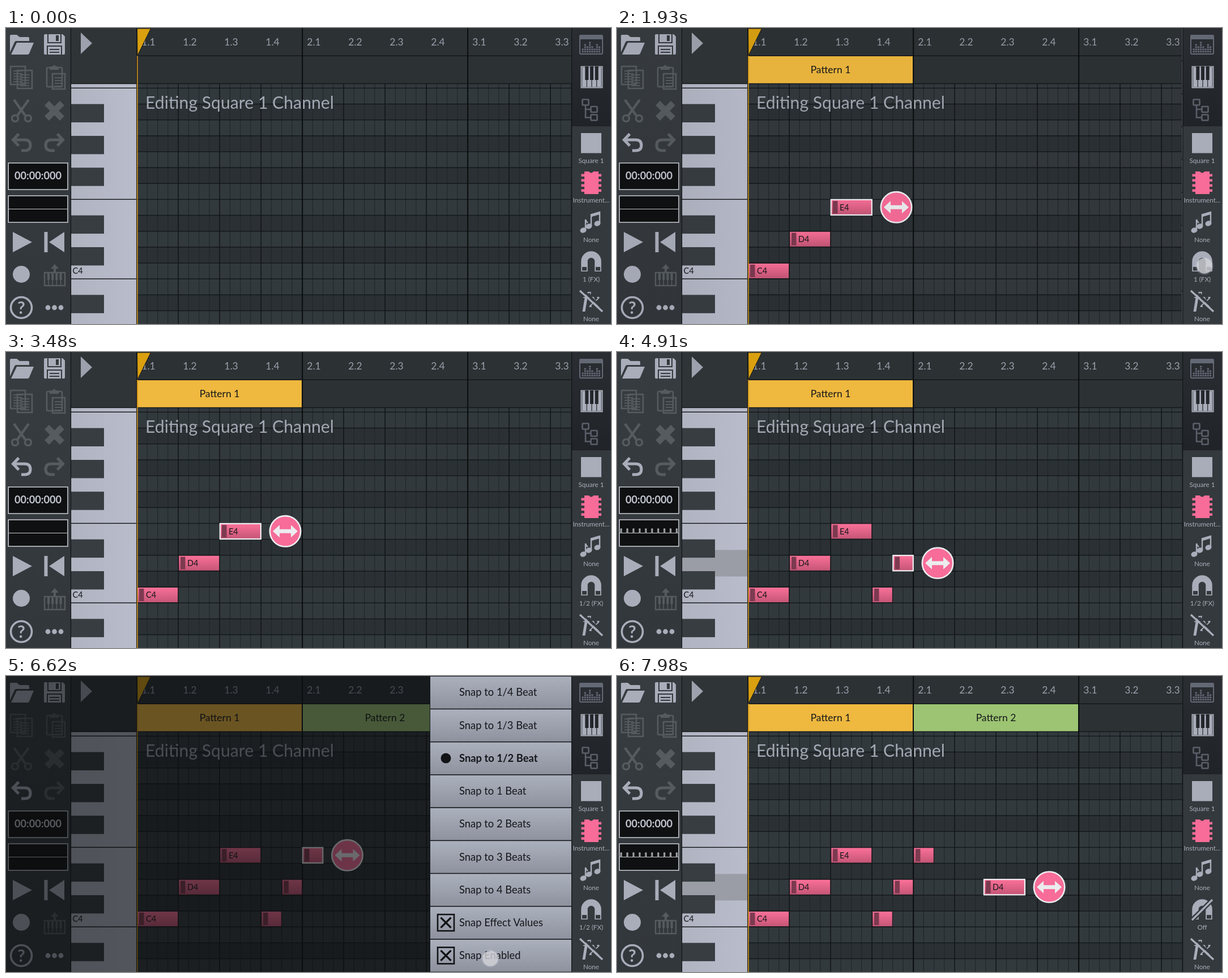
Animation, 1068 px wide and 524 px high, one loop 8 s. Source, as an HTML page:

```html
<!DOCTYPE html>
<html lang="en">
<head>
<meta charset="utf-8">
<title>Piano roll</title>
<style>
  html, body { margin: 0; width: 100%; height: 100%; overflow: hidden; background: #2c3134; }
  svg { display: block; width: 100vw; height: 100vh; font-family: Lato, "Open Sans", sans-serif; }
  .on { fill: #a9adba; }
  .off { fill: #555b5f; }
  .line { fill: none; stroke: #a9adba; }
  .offline { fill: none; stroke: #555b5f; }
  .small { font-size: 11.7px; text-anchor: middle; fill: #a9adba; }
</style>
</head>
<body>
<svg id="stage" viewBox="0 0 1068 524" preserveAspectRatio="none"></svg>
<script>
const LOOP = 8000, STEP = 70;
const X0 = 231, BEAT = 73, ROW = 28.15, TOP = 106.2, EDGE = 998;
const PANEL = '#34393d', DARK = '#131719';

const rect = (x, y, w, h, fill, extra = '') =>
  `<rect x="${x}" y="${y}" width="${w}" height="${h}" fill="${fill}" ${extra}/>`;
const path = (d, cls, extra = '') => `<path d="${d}" class="${cls}" ${extra}/>`;
const stroke = (d, color, width, extra = '') =>
  `<path d="${d}" fill="none" stroke="${color}" stroke-width="${width}" ${extra}/>`;
const text = (x, y, size, fill, str, extra = '') =>
  `<text x="${x}" y="${y}" font-size="${size}" fill="${fill}" ${extra}>${str}</text>`;
const dot = (x, y, r, fill) => `<circle cx="${x}" cy="${y}" r="${r}" fill="${fill}"/>`;
const times = (n, f) => Array.from({ length: n }, (_, i) => f(i)).join('');
const gradient = (id, a, b, dir = 'x2="0" y2="1"') =>
  `<linearGradient id="${id}" ${dir}><stop stop-color="${a}"/><stop offset="1" stop-color="${b}"/></linearGradient>`;
const clamp = v => Math.min(1, Math.max(0, v));

// Intervals in which the picture advances; it rests between them.
const SPANS = [[0, 0], [260, 1800], [1860, 2140], [3200, 3480], [4070, 5960], [6620, 6900], [7490, 7980]];
function snapTime(t) {
  const [a, b] = SPANS.filter(s => s[0] <= t).pop();
  return Math.min(b, a + STEP * Math.floor((t - a) / STEP));
}

const PITCH = {
  E4: { row: 7, key: 303.4, period: 9.7 },
  D4: { row: 9, key: 350.4, period: 10.9 },
  C4: { row: 11, key: 397.4, period: 12.2 }
};
const NOTES = [
  { at: 330, beat: 0, len: 1, name: 'C4' },
  { at: 820, beat: 1, len: 1, name: 'D4' },
  { at: 1310, beat: 2, len: 1, name: 'E4' },
  { at: 4140, beat: 3, len: .5, name: 'C4' },
  { at: 4630, beat: 3.5, len: .5, name: 'D4' },
  { at: 5120, beat: 4, len: .5, name: 'E4' },
  { at: 7560, beat: 5.7, len: 1, name: 'D4', free: true }
];
const SOUND = 490;
const rowY = r => TOP + ROW * r;
const TOUCHES = NOTES.map(n => ({
  at: n.at - STEP,
  x: X0 + BEAT * n.beat + (n.free ? 1 : 30 * n.len),
  y: rowY(PITCH[n.name].row) + 6.5
})).concat([
  { at: 1860, x: 1037, y: 421 },
  { at: 3200, x: 868, y: 148 },
  { at: 5680, x: 1037, y: 421 },
  { at: 6620, x: 855, y: 500 }
]);
const MENUS = [{ open: 1920, close: 3200 }, { open: 5737, close: 6620 }];
const ITEMS = ['1/4 Beat', '1/3 Beat', '1/2 Beat', '1 Beat', '2 Beats', '3 Beats', '4 Beats']
  .map(s => 'Snap to ' + s).concat('Snap Effect Values', 'Snap Enabled');

function grid() {
  const isBlack = r => [1, 3, 5, 8, 10, 13].includes(r);
  return rect(X0, 98, 768, 426, '#32393d') +
    times(15, r => isBlack(r) ? rect(X0, rowY(r), 768, ROW, '#2a3034') : '') +
    times(43, i => i % 4 ? rect(X0 + i * BEAT / 4 - .5, 99, 1.2, 425, '#22272a') : '') +
    times(15, r => rect(X0, rowY(r) - .5, 768, 1.4, DARK)) +
    times(11, i => rect(X0 + i * BEAT - .7, 98, 1.6, 426, DARK)) +
    rect(X0, 0, 768, 98, '#2c3134') +
    rect(X0, 48.5, 768, 1.4, DARK) + rect(X0, 97.8, 768, 1.4, DARK) +
    [4, 8].map(b => rect(X0 + b * BEAT - .9, 0, 2.1, 524, '#0c0f10')).join('') +
    times(11, i => text(X0 + 8.3 + i * BEAT, 31, 17.5, '#9a9fab', `${1 + (i >> 2)}.${1 + i % 4}`)) +
    text(246, 143, 30.2, '#a3a8b3', 'Editing Square 1 Channel');
}

function keys() {
  return rect(115, 0, 116, 98, '#2f3437') +
    path('M132 8V46L152 27z', 'on', 'opacity=".9"') +
    rect(115, 99, 115, 425, 'url(#ivory)') +
    '<rect id="press" x="115" width="115" height="47" fill="#9b9da6"/>' +
    [1, 3, 5, 8, 10, 13].map(r => rect(115, rowY(r) + .3, 58, 32.4, '#373d41')).join('') +
    [0, 7, 12].map(r => rect(115, rowY(r) - .6, 116, 1.4, '#101214')).join('') +
    rect(115, 97.8, 116, 1.4, DARK) + rect(230, 0, 1.2, 524, DARK) +
    text(117.5, 435, 14.5, '#15171a', 'C4');
}

function tools() {
  const back = 'M22.500 187.500L12.500 198L22.500 208.500M13 198H33q10 0 10 9.500t-10 9.500H27';
  const page = (x, y) =>
    rect(x, y, 26, 32, PANEL, 'class="offline" stroke-width="2.6"') +
    times(5, i => rect(x + 5, y + 7 + i * 4.8, 16, 2, '#555b5f'));
  return rect(0, 0, 114, 524, 'url(#side)') + rect(113.8, 0, 1.3, 524, DARK) +
    // open and save
    path('M7 43V14q0-2 2-2h10l5 4h15q2 0 2 2v5H18q-2 0-3 2z', 'on') +
    path('M19 26H49L41 45q-1 2-3 2H9z', 'on') +
    path('M69 11H100l4 4V45q0 2-2 2H69q-2 0-2-2V13q0-2 2-2z', 'on') +
    rect(73, 11, 25, 16, PANEL) + rect(75, 11, 21, 14, '#a9adba') + rect(88, 13, 5, 10, PANEL) +
    rect(72, 31, 27, 16, PANEL) + rect(74, 33, 23, 14, '#a9adba') +
    rect(77, 37, 17, 2, PANEL) + rect(77, 42, 17, 2, PANEL) +
    // copy and paste
    page(8, 68) + page(20, 75) +
    rect(72, 70, 27, 34, PANEL, 'class="offline" stroke-width="2.6" rx="2"') +
    path('M77 74v-4q0-2 2-2h3q3-5 6 0h3q2 0 2 2v4z', 'off') +
    rect(82, 81, 22, 27, PANEL, 'class="offline" stroke-width="2.6"') +
    times(4, i => rect(86, 87 + i * 5, 14, 2, '#555b5f')) +
    // cut and delete
    path('M14 127L34 155M40 127L20 155', 'offline', 'stroke-width="4.500"') +
    '<circle cx="16" cy="160" r="5.5" class="offline" stroke-width="3.5"/>' +
    '<circle cx="39" cy="160" r="5.5" class="offline" stroke-width="3.5"/>' +
    path('M72 133L99 160M99 133L72 160', 'offline', 'stroke-width="11"') +
    // undo and redo
    path(back, '', 'id="undo" fill="none" stroke-width="5"') +
    path(back, 'offline', 'stroke-width="5" transform="translate(113 0) scale(-1 1)"') +
    // clock and scope
    [239, 297].map(y => rect(4.2, y, 104.8, 47, '#0e1011', 'stroke="#c3c6cd" stroke-width="1.6"')).join('') +
    text(56.5, 268, 18.2, '#c3c6d2', '00:00:000', 'font-weight="700" text-anchor="middle"') +
    '<path id="scope" fill="none" stroke="#c9ccd3" stroke-width="1.2"/>' +
    // transport
    path('M12 361V397L46 379z', 'on') + rect(67.5, 361, 6, 36, '#a9adba') +
    path('M103 361V397L76 379z', 'on') + dot(27, 436, 15, '#a9adba') +
    rect(68, 433, 36, 23, 'none', 'class="offline" stroke-width="2.4"') +
    times(4, i => rect(73 + i * 7.2, 433, 4, 13, '#555b5f') + rect(74.2 + i * 7.2, 446, 1.6, 10, '#555b5f')) +
    path('M86 418L93 426H88V432H84V426H79z', 'off') +
    '<circle cx="27" cy="495" r="18.5" class="line" stroke-width="3.6"/>' +
    text(27, 505.5, 30, '#a9adba', '?', 'font-weight="700" text-anchor="middle"') +
    [74, 85.5, 97].map(x => dot(x, 495, 4.4, '#a9adba')).join('');
}

function sidebar() {
  const dim = '#646976', label = (y, s, id = '') => `<text x="1033" y="${y}" class="small" ${id}>${s}</text>`;
  return rect(EDGE, 0, 70, 524, PANEL) + rect(EDGE, 0, 70, 174, 'url(#shade)') +
    rect(EDGE, 0, 1.3, 524, DARK) +
    // mixer
    rect(1013, 13, 40, 33, 'none', `stroke="${dim}" stroke-width="2" rx="2"`) + rect(1013, 12, 40, 8, dim) +
    [2, 4, 3, 5, 3, 2, 4, 3].map((n, i) =>
      times(n, k => rect(1016.5 + i * 4.2, 40.5 - k * 4, 3.2, 2.8, dim))).join('') +
    // piano
    rect(1014.500, 67.500, 39, 39, '#a9adba') + rect(1016.5, 69.5, 35, 35, '#23272b') +
    times(4, i => rect(1017.2 + i * 8.7, 69.5, 7.5, 35, '#a9adba')) +
    times(3, i => rect(1022.3 + i * 8.7, 68, 6, 24, '#23272b')) +
    // routing tree
    [[1017.5, 126.5], [1032.5, 139], [1032.5, 153.5]].map(([x, y]) =>
      rect(x, y, 11, 10, 'none', 'stroke="#5a5f69" stroke-width="2.6" rx="1"')).join('') +
    stroke('M1023 137V158.500H1032M1023 144H1032', '#5a5f69', 2.6) +
    rect(1015, 186, 36, 35.5, '#a9adba') + label(238.5, 'Square 1') +
    // chip
    times(4, i => rect(1015.5, 258.5 + i * 9, 35.5, 4.4, '#f76c98')) +
    path('M1021 254H1029q4 5 8 0H1046V294H1021z', '', 'fill="#f76c98"') + label(308.5, 'Instrument...') +
    // arpeggio
    [[1019, 358], [1029, 351], [1044, 346]].map(([x, y]) =>
      `<ellipse cx="${x}" cy="${y}" rx="5.6" ry="4.6" class="on" transform="rotate(-20 ${x} ${y})"/>`).join('') +
    stroke('M1023 358V339q1 4 4 6M1033 350V330.500L1048 326V345', '#a9adba', 2.4) +
    stroke('M1033 332L1048 327.500', '#a9adba', 4.500) + label(378.5, 'None') +
    // snap magnet
    stroke('M1021 431V413a12 12 0 0 1 24 0V431', '#a9adba', 11.5) +
    rect(1017, 423, 8, 6.5, PANEL) + rect(1041, 423, 8, 6.5, PANEL) +
    '<g id="slash">' + stroke('M1014 433L1051 396', PANEL, 8) + stroke('M1015 432L1051 396', '#a9adba', 3.2) + '</g>' +
    label(448.5, '', 'id="snap"') +
    // effects
    text(1033, 494, 37, '#a9adba', 'fx', 'font-family="Liberation Serif, Noto Serif, serif" font-style="italic" font-weight="700" text-anchor="middle"') +
    stroke('M1014 464L1054 501', PANEL, 4, 'transform="translate(2 -2)"') +
    stroke('M1013 465L1053 502', '#a9adba', 3.4) + label(518.5, 'None');
}

function menuItems(chosen, enabled) {
  const h = 524 / 9;
  return ITEMS.map((s, i) => {
    const y = i * h, mid = y + h / 2, bold = i === chosen;
    const tick = i === 7 || enabled;
    const box = i < 7 ? '' :
      rect(14, mid - 14.5, 29, 29, 'none', 'stroke="#111315" stroke-width="2.6"') +
      (tick ? stroke(`M19.500 ${mid - 9}l18 18m0-18l-18 18`, '#111315', 3.4) : '');
    return rect(0, y, 250, h, '#15181b') + rect(1, y + 1, 249, h - 1.6, 'url(#item)') +
      (bold ? dot(28.5, mid, 9, '#111315') : '') + box +
      text(52, mid + 6.3, 18.4, '#15171a', s, bold ? 'font-weight="700"' : '');
  }).join('');
}

function noteShape(n, selected) {
  const x = X0 + BEAT * n.beat, w = BEAT * n.len, y = rowY(PITCH[n.name].row);
  const mid = y + ROW / 2, hx = x + w + 43;
  const frame = selected ? 'stroke="#f0eff2" stroke-width="2.2"' : 'stroke="#15181a" stroke-width="1"';
  const arrow = `M${hx - 22} ${mid}l12 -11v7.500h20v-7.500l12 11l-12 11v-7.500h-20v7.500z`;
  return rect(x + .8, y + .6, w - 1, ROW - 1, 'url(#pink)', frame) +
    rect(x + 4, y + 3, 8.5, ROW - 6, '#7c3a50') +
    (n.len === 1 ? text(x + 16, mid + 5.3, 14.5, '#15171a', n.name) : '') +
    (selected ? `<circle cx="${hx}" cy="${mid}" r="27.2" fill="#f76c98" stroke="#ececef" stroke-width="2.6"/>` +
      path(arrow, '', 'fill="#ececef"') : '');
}

const pattern = (i, fill) =>
  rect(X0 + 1 + i * 292, 50, 290, 47.8, fill) +
  text(X0 + 146 + i * 292, 80.2, 17.5, '#15171a', 'Pattern ' + (i + 1), 'text-anchor="middle"');

function scopePath(period) {
  if (!period) return 'M5 320.500H108';
  let d = 'M5 320.500';
  for (let x = 6.500; x < 106; x += period) d += `H${x}V313H${x + 1.7}V320.500`;
  return d + 'H108';
}

const stage = document.getElementById('stage');
stage.innerHTML = '<defs>' +
  gradient('pink', '#fb7199', '#c45576') + gradient('item', '#abb0bd', '#8e929e') +
  gradient('ivory', '#b0b4c1', '#b9bccb', 'x2="1" y2="0"') +
  gradient('side', '#363c40', '#32373b') + gradient('shade', '#2a2e32', '#202328') + '</defs>' +
  grid() + '<g id="score"></g>' + keys() +
  rect(X0, 49, 1.7, 475, '#c78f1c') +
  '<path d="M231.500 1H255.500L232 49z" fill="#daa010" stroke="#15181a"/>' +
  tools() + `<rect id="shadow" width="${EDGE}" height="524" fill="#0c0d0f"/>` +
  '<g id="menu"></g>' + sidebar() + '<g id="touch"></g>';

const el = id => document.getElementById(id);
const show = (id, yes) => el(id).setAttribute('visibility', yes ? 'visible' : 'hidden');

function draw(t) {
  const placed = NOTES.filter(n => n.at <= t), last = placed[placed.length - 1];
  const pitch = last && t < last.at + SOUND ? PITCH[last.name] : null;
  const snapOff = t >= 6690, half = t >= 3270;

  el('score').innerHTML =
    (placed.length ? pattern(0, '#efb83f') : '') +
    (placed.length > 5 ? pattern(1, '#9cc472') : '') +
    placed.map(n => noteShape(n, n === last)).join('');
  show('press', pitch);
  if (pitch) el('press').setAttribute('y', pitch.key);
  el('scope').setAttribute('d', scopePath(pitch && pitch.period));
  el('undo').setAttribute('stroke', last ? '#a9adba' : '#555b5f');
  show('slash', snapOff);
  el('snap').textContent = snapOff ? 'Off' : half ? '1/2 (FX)' : '1 (FX)';

  // The shade fades evenly while the menu eases in and out.
  const open = Math.max(...MENUS.map(m => clamp((t - m.open) / 220) - clamp((t - m.close) / 159)));
  const slide = open * open * (3 - 2 * open);
  el('shadow').setAttribute('opacity', .58 * open);
  el('menu').innerHTML = open > 0 ? menuItems(half ? 2 : 3, !snapOff) : '';
  el('menu').setAttribute('transform', `translate(${EDGE - 250 * slide} 0)`);

  const tap = TOUCHES.find(p => t >= p.at && t < p.at + 3 * STEP);
  el('touch').innerHTML = tap
    ? `<g opacity="${t - tap.at < 2 * STEP ? .78 : .5}">` + dot(tap.x, tap.y, 16, 'rgba(190,195,210,.3)') +
      dot(tap.x, tap.y, 13.8, '#d6d7dc') + '</g>'
    : '';
}

const start = performance.now();
let shown = -1;
function tick() {
  const t = snapTime((performance.now() - start) % LOOP);
  if (t !== shown) draw(shown = t);
  requestAnimationFrame(tick);
}
tick();
</script>
</body>
</html>
```
